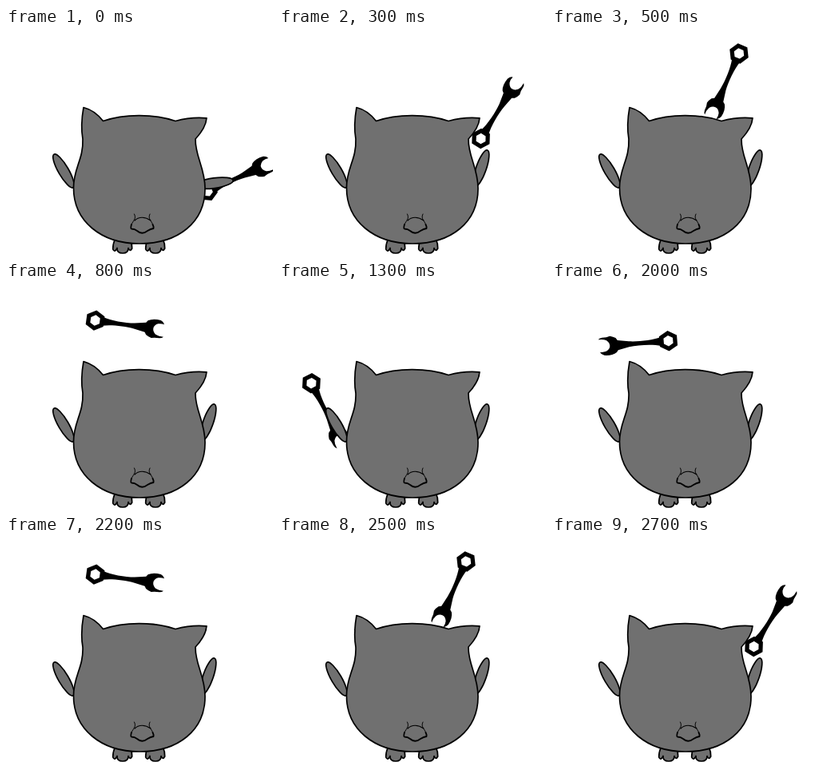
Animation, 334 px wide and 283 px high, one loop 2.8 s. Source, as an HTML page:

```html
<!DOCTYPE html>
<html lang="en">
<head>
<meta charset="utf-8">
<title>Wrench juggler</title>
<style>
  html, body { margin: 0; width: 100%; height: 100%; overflow: hidden; background: #fff; }
  svg { display: block; width: 100%; height: 100%; }
  .skin { fill: #707070; stroke: #000; stroke-width: 1.7; stroke-linejoin: round; }
  .line { fill: none; stroke: #000; stroke-linecap: round; stroke-linejoin: round; }
</style>
</head>
<body>
<svg viewBox="0 0 334 283">
  <defs>
    <ellipse id="arm" class="skin" cx="20" rx="24" ry="6.4"/>
    <path id="foot" class="skin"
      d="M136.500 264 Q133.500 271 133.700 277 Q136 282 139 275.500 Q138.500 282 146 282 Q153 282 153 275.500 Q155 281 157.700 276 Q158 270 155 264 Z"/>
  </defs>

  <g id="wrench">
    <path fill-rule="evenodd" d="M-26.3 -6.4 V6.4 L-37.4 12.8 L-48.5 6.4 V-6.4 L-37.4 -12.8 Z
      M-31.600 -3.400 V3.400 L-37.400 6.800 L-43.200 3.400 V-3.400 L-37.400 -6.800 Z"/>
    <path d="M-28 -5.500 C-18 -2.500 0 -1.800 12 -3.500 L26 -6.300 L28 -9 Q34 -13 44 -11.500 Q48 -10 49 -7
      Q45 -8 41 -6.700 Q36 -4 36 0 Q36 4 40 7 Q44 9 50 8.500 Q48.500 10.500 45 10.800 Q39 10.500 35 12
      Q31 11 28 9 L26 5.800 L12 3.500 C0 1.800 -18 2.500 -28 5.500 Z"/>
  </g>
  <use id="leftArm" href="#arm"/>
  <use id="rightArm" href="#arm"/>
  <use href="#foot"/>
  <use href="#foot" x="41"/>

  <path class="skin" d="M97 99.500 Q111 103 121.500 116.500 C147 107.500 185 107 212 116.500
    Q232 111 251 112.800 Q250 125 237 139 C236.500 161 249 175 249 201
    C249 243 216 270 167 270 C119 270 84.500 242 84.500 200 C84.500 175 97 165 96 139 Q93 122 97 99.500 Z"/>
  <path class="line" stroke-width="1" d="M160.500 233 C163.500 239 159 241 157 246 M180 233 C177 239 182 241 183.500 246"/>
  <path class="line" stroke-width="1.200" d="M161 241 C166 236 174 236 181 241"/>
  <path class="line" stroke-width="1.800" d="M157 246 Q155.500 251 157 251.500 Q161 251.500 164 254 Q170 259.500 177 254 Q181 251.500 184.500 251 Q185 249 183.500 246"/>
</svg>
<script>
  const STEP = 100, STEPS = 28, FLIGHT = 10;

  // Poses are [x, y, angle].
  const ARMS = {
    left:  { up: [82, 196.3, -120],    mid: [92, 196, 187], low: [91, 200, 178] },
    right: { up: [246.4, 194.6, -71],  mid: [240.5, 197, -8], low: [242, 199, 5] }
  };
  const HELD = {
    left:  { mid: [50, 195, 8],        low: [51, 202, -2] },
    right: { mid: [286.3, 189.2, -24], low: [288, 206, -2] }
  };
  const THROWN = [272.4, 106.8, -58], TOP = [148.6, 53.3, 368], CAUGHT = [57.5, 160, 783];

  // Parabola through three poses at u = 0, 0.5 and 1.
  const flightPose = u => THROWN.map((start, i) =>
    start * (1 - u) * (1 - 2 * u) + 4 * TOP[i] * u * (1 - u) + CAUGHT[i] * u * (2 * u - 1));

  function place(id, [x, y, angle]) {
    document.getElementById(id).setAttribute('transform', `translate(${x} ${y}) rotate(${angle})`);
  }

  function draw(step) {
    const half = STEPS / 2;
    const side = step < half ? 'right' : 'left';
    const beat = step % half;
    // Each half: catch, two low beats, then the throw across.
    const hold = beat === 0 ? 'mid' : beat < 3 ? 'low' : 'up';
    const u = (beat - 3) / FLIGHT;

    place('leftArm', ARMS.left[side === 'left' ? hold : 'up']);
    place('rightArm', ARMS.right[side === 'right' ? hold : 'up']);
    place('wrench', hold === 'up' ? flightPose(side === 'right' ? u : 1 - u) : HELD[side][hold]);
  }

  const start = performance.now();
  function tick() {
    draw(Math.floor((performance.now() - start) / STEP) % STEPS);
    requestAnimationFrame(tick);
  }
  tick();
</script>
</body>
</html>
```
